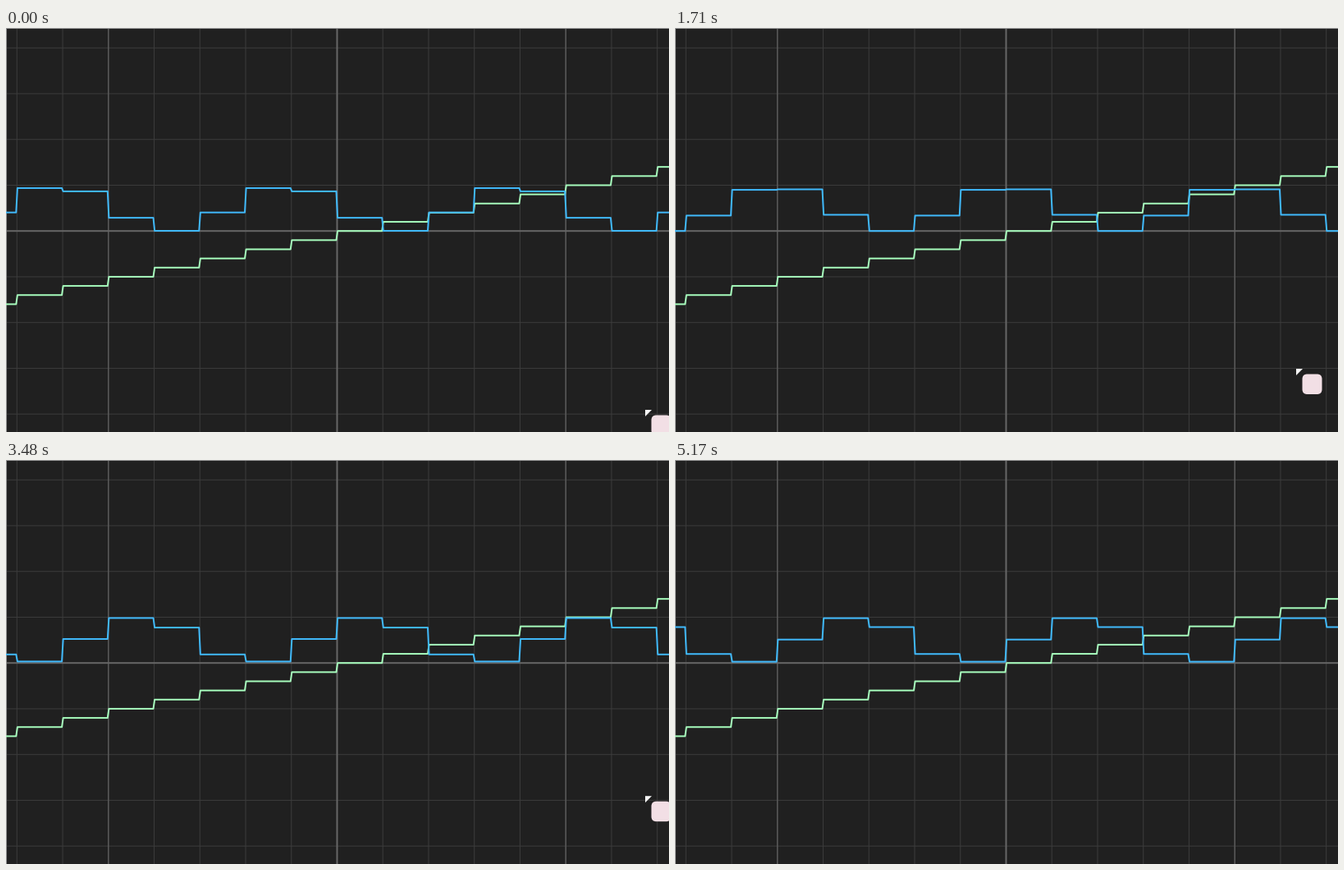
Write a matplotlib script that moves like this. It is 808 by 492 pixels and loops after 5270 ms.

```python
import numpy as np
import matplotlib.pyplot as plt
from matplotlib.animation import FuncAnimation
from matplotlib.collections import LineCollection
from matplotlib.patches import FancyBboxPatch, Polygon
from matplotlib.transforms import Affine2D

W, H, DPI = 808, 492, 100
PX = 72 / DPI
LOOP, TICK, STEP = 5270, 10, 60
CX, CY, UNIT = 403.5, 247.2, 55.74

BG, MINOR, MAJOR, AXIS = "#202020", "#3c3c3c", "#585858", "#666666"
BLUE, GREEN = "#40b9fb", "#a6fcbc"

# The picture refreshes every STEP ms; the clock restarts at these times.
RESYNC = [0, 1710, 2160, 3520, 3860, 4390, 5200]
starts = np.concatenate([np.arange(a, b, STEP)
                         for a, b in zip(RESYNC, RESYNC[1:])])

# Pointer: rests, glides up left, rests, returns right, then drops out.
KEY_T = [600, 1380, 2940, 3240, 4220, 4450]
KEY_X = [779, 757, 757, 779, 779, 779]
KEY_Y = [465, 415, 415, 408, 413, 500]

fig = plt.figure(figsize=(W / DPI, H / DPI), dpi=DPI, facecolor=BG)
ax = fig.add_axes([0, 0, 1, 1])
ax.set_xlim(0, W)
ax.set_ylim(H, 0)
ax.axis("off")


def rules(segments, color, width, z):
    lines = LineCollection(segments, colors=color, linewidths=width * PX, zorder=z)
    lines.set_snap(False)
    ax.add_collection(lines)


def vline(x):
    return [(x, 0), (x, H)]


def hline(y):
    return [(0, y), (W, y)]


cols = np.arange(-7, 8)
rows = np.arange(-4, 5)
rules([vline(CX + k * UNIT) for k in cols if k % 5]
      + [hline(CY + k * UNIT) for k in rows if k], MINOR, 1, 1)
rules([vline(CX + k * UNIT) for k in (-5, 5)], MAJOR, 1.6, 2)
rules([vline(CX), hline(CY)], AXIS, 2, 3)
rules([hline(0.5), vline(0.5)], "#969696", 1, 4)

cells = np.arange(-8, 8)
edges = CX + cells * UNIT
step_x = np.column_stack([edges + 0.6, edges + UNIT - 1]).ravel()


def step_y(values):
    return np.repeat(CY - values * UNIT, 2)


def trace(color, z):
    return ax.plot(step_x, step_y(cells / 5), color=color, lw=2 * PX,
                   solid_joinstyle="round", snap=False, zorder=z)[0]


trace(GREEN, 5)
wave = trace(BLUE, 6)

arrow = Polygon([(0, 0), (8, 0), (0, 8)], fc="#f6f6f6", ec="none", zorder=8)
badge = FancyBboxPatch((7.5, 6.5), 24, 24.5, boxstyle="round,pad=0,rounding_size=6",
                       fc="#f2dfe5", ec="none", zorder=8)
for part in (arrow, badge):
    ax.add_patch(part)


def phase(t):
    return np.radians(115 + 0.3722 * t + 1.2e-6 * t * t)


def draw(i):
    t = float(starts[starts <= i * TICK][-1])
    angle = phase(t) + 2 * np.pi * cells / 5
    wave.set_ydata(step_y(0.5 + 0.5 * np.cos(angle)))
    x, y = np.interp(t, KEY_T, KEY_X), np.interp(t, KEY_T, KEY_Y)
    for part in (arrow, badge):
        part.set_transform(Affine2D().translate(x, y) + ax.transData)
    return wave, arrow, badge


anim = FuncAnimation(fig, draw, frames=LOOP // TICK, interval=TICK,
                     repeat=True, repeat_delay=0, blit=False)
plt.show()
```
